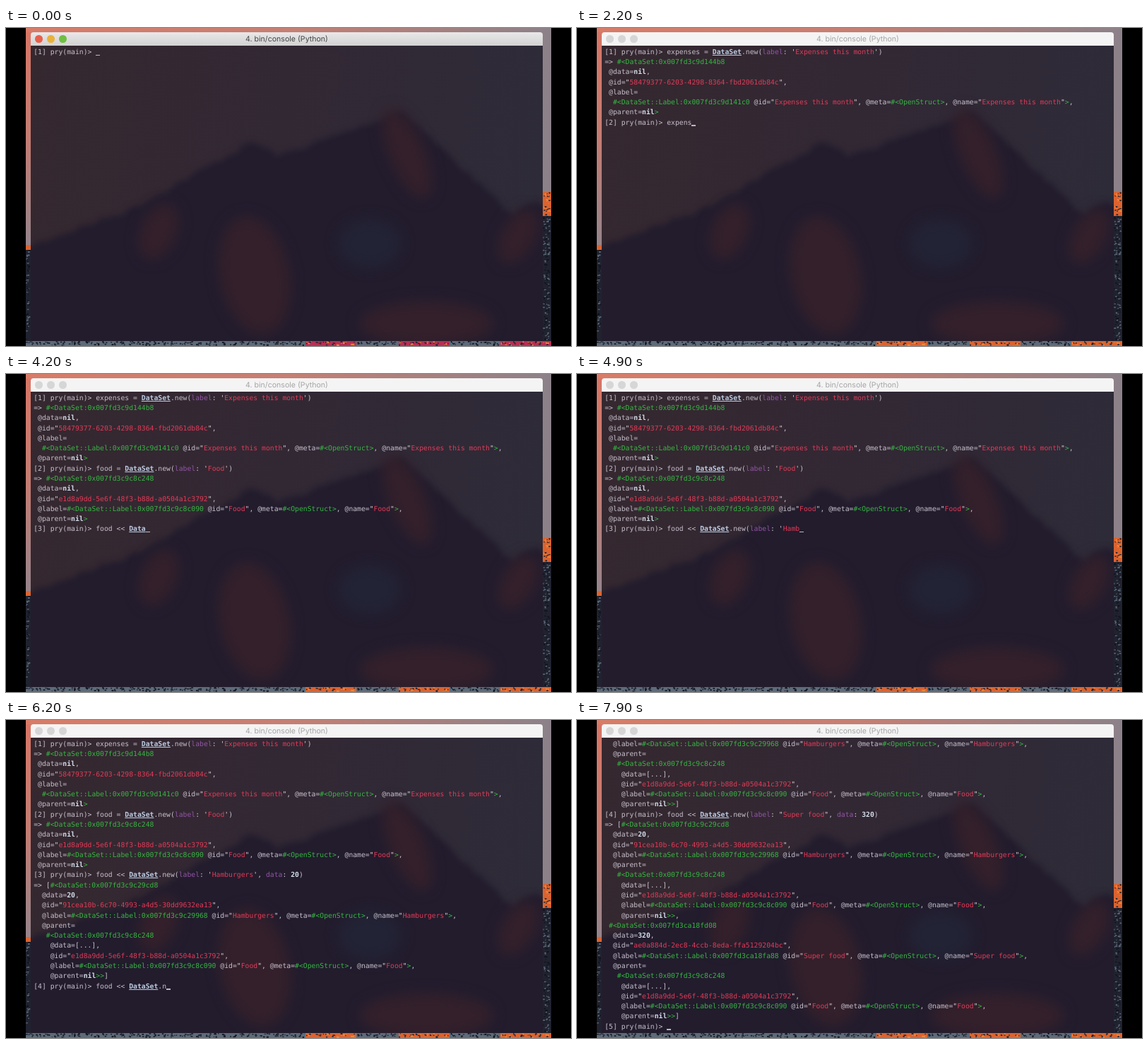
Recreate the animation shown at these times as an HTML page with a canvas. Size 800 by 450 pixels, loop 8 s.

```html
<!DOCTYPE html>
<html lang="en">
<head>
<meta charset="utf-8">
<title>Console session</title>
<style>
html, body { margin: 0; width: 100%; height: 100%; overflow: hidden; background: #000; }
#stage { position: relative; width: 800px; height: 450px; overflow: hidden; }
canvas { position: absolute; left: 0; top: 0; }
#bar {
  position: absolute; left: 35px; top: 6px; width: 725px; height: 19px;
  border-radius: 4px 4px 0 0; background: #f4f4f4; color: #a5a5a5;
  font: 10.6px/19px Inter, "Liberation Sans", sans-serif; text-align: center;
  text-rendering: geometricPrecision;
}
#bar.active { background: linear-gradient(#e9e8e9, #d3d2d3); color: #444; }
#buttons { position: absolute; left: 6.3px; top: 4.3px; display: flex; gap: 6.6px; }
#buttons i { width: 10.4px; height: 10.4px; border-radius: 50%; background: #d6d6d6; }
.active i { background: var(--c) !important; }
pre {
  position: absolute; left: 39.2px; top: 27.8px; margin: 0; color: #c6c0cc;
  font: 9.76px/14.28px "DejaVu Sans Mono", "Liberation Mono", monospace;
  text-rendering: geometricPrecision;
}
.str { color: #e33a57; }
.quote { color: #dcd3d6; }
.obj { color: #35b742; }
.key { color: #9354a6; }
.val, .const { color: #d3deea; font-weight: bold; }
.const { color: #bccbe2; text-decoration: underline; }
.cursor { display: inline-block; width: 5.9px; height: 1.3px; background: #bdb9c8; vertical-align: -2px; }
</style>
</head>
<body>
<div id="stage">
  <canvas width="800" height="450"></canvas>
  <div id="bar">
    <div id="buttons"><i style="--c:#e8604c"></i><i style="--c:#e9b23c"></i><i style="--c:#70bf44"></i></div>
    4. bin/console (Python)
  </div>
  <pre></pre>
</div>
<script>
const LOOP = 8000, STEP = 100, ROWS = 29, FOCUS_END = 300;
const LEFT = 28, RIGHT = 772, BOTTOM = 450;
const win = { x: 35, y: 20, w: 725, h: 423 };
const ctx = document.querySelector('canvas').getContext('2d');
const bar = document.querySelector('#bar');
const screen = document.querySelector('pre');

// ---- wallpaper and translucent window ----

function gradient(x, y, ...colors) {
  const g = ctx.createLinearGradient(LEFT, 0, x, y);
  colors.forEach((c, i) => g.addColorStop(i / (colors.length - 1), c));
  return g;
}

function rect(color, x, y, w, h) {
  ctx.fillStyle = color;
  ctx.fillRect(x, y, w, h);
}

function seeded(seed) {
  return () => (seed = seed * 16807 % 2147483647) / 2147483647;
}

function mottle(random, base, colors, x, y, w, h) {
  rect(base, x, y, w, h);
  for (let i = 0; i < w * h / 14; i++) {
    rect(colors[Math.floor(random() * colors.length)],
      x + random() * (w - 3), y + random() * (h - 2), 1 + random() * 2, 1 + random());
  }
}

function drawDesktop(active) {
  const random = seeded(41);
  const ember = '#dc632f', navy = '#20222f', slate = '#5d6b7a', black = '#11131c';
  const hot = active ? '#b92f55' : ember;
  const edge = win.y + win.h, side = win.x + win.w;
  rect(gradient(RIGHT, 0, '#d87c68', '#c67f73', '#8c8189'), LEFT, 0, RIGHT - LEFT, 235);
  rect(gradient(LEFT, 310, '#d87565', '#c47c72', '#94848c'), LEFT, 6, 7, 304);
  rect(ember, LEFT, 307, 7, 8);
  mottle(random, ember, [navy, '#f08a3c'], side, 232, RIGHT - side, 34);
  mottle(random, navy, [slate, black], side, 266, RIGHT - side, edge - 266);
  mottle(random, navy, [slate, black], LEFT, 314, 7, edge - 314);

  // glowing rocks alternate with slate along the lower edge
  for (let x = LEFT; x < RIGHT; x += 12) {
    const glowing = x > 410 && Math.sin((x - 418) / 22) > -0.1;
    mottle(random, glowing ? hot : slate, [navy, glowing ? '#f08a3c' : black], x, edge, 12, BOTTOM - edge);
  }
}

// each peak: x, height, left slope, right slope
const PEAKS = [[350, 157, 0.55, 0.55], [562, 114, 0.36, 0.95], [740, 243, 0.9, 0.1]];
// each lit face: x, y, radii, tilt
const FACES = [[568, 178, 26, 68, -0.4], [216, 288, 26, 42, 0.4], [352, 350, 50, 85, -0.2],
  [725, 295, 24, 42, 0.5], [595, 418, 95, 32, 0]];

const ridge = x => Math.min(...PEAKS.map(([px, py, l, r]) => py + (x < px ? (px - x) * l : (x - px) * r)));

function ellipse(color, x, y, rx, ry, tilt) {
  ctx.fillStyle = color;
  ctx.beginPath();
  ctx.ellipse(x, y, rx, ry, tilt, 0, 7);
  ctx.fill();
}

function drawWindow() {
  const random = seeded(7);
  ctx.save();
  ctx.beginPath();
  ctx.rect(win.x, win.y, win.w, win.h);
  ctx.clip();
  rect(gradient(RIGHT, 120, '#35282f', '#322834', '#2e2b38'), win.x, win.y, win.w, win.h);
  ctx.filter = 'blur(4px)';
  ctx.fillStyle = '#221c2d';
  ctx.beginPath();
  ctx.moveTo(0, 500);
  for (let x = 0; x <= 800; x += 8) ctx.lineTo(x, ridge(x) + random() * 8);
  ctx.lineTo(800, 500);
  ctx.fill();
  ctx.filter = 'blur(9px)';
  FACES.forEach(face => ellipse('#33202b', ...face));
  ellipse('#222335', 515, 305, 45, 35, 0);
  ctx.restore();
}

function drawBackdrop(active) {
  rect('#000', 0, 0, 800, BOTTOM);
  drawDesktop(active);
  drawWindow();
}

// ---- console session ----

const label = (addr, name) =>
  `#<DataSet::Label:0x007fd3${addr} @id="${name}", @meta=#<OpenStruct>, @name="${name}">`;

function dataSet(indent, addr, data, id, tag, parent = 'nil') {
  const pad = '\n' + ' '.repeat(indent);
  return `#<DataSet:0x007fd3${addr}` + [`data=${data},`, `id="${id}",`, `label=${tag},`, `parent=${parent}>`]
    .map(field => `${pad}@${field}`).join('');
}

const food = (indent, data) => dataSet(indent, 'c9c8c248', data,
  'e1d8a9dd-5e6f-48f3-b88d-a0504a1c3792', label('c9c8c090', 'Food'));
const child = (...fields) => dataSet(2, ...fields, '\n   ' + food(4, '[...]'));
const burgers = child('c9c29cd8', 20, '91cea10b-6c70-4993-a4d5-30dd9632ea13',
  label('c9c29968', 'Hamburgers'));
const superFood = child('ca18fd08', 320, 'ae0a884d-2ec8-4ccb-8eda-ffa5129204bc',
  label('ca18fa88', 'Super food'));

// typed evenly from start to end, run when the next entry starts;
// an entry without output is typed and then erased
const session = [
  { start: 550, end: 1900, text: "expenses = DataSet.new(label: 'Expenses this month')",
    output: dataSet(1, 'c9d144b8', 'nil', '58479377-6203-4298-8364-fbd2061db84c',
      '\n  ' + label('c9d141c0', 'Expenses this month')) },
  { start: 2000, end: 2540, text: 'expenses' },
  { start: 2600, end: 3670, text: "food = DataSet.new(label: 'Food')", output: food(1, 'nil') },
  { start: 3770, end: 5540, text: "food << DataSet.new(label: 'Hamburgers', data: 20)",
    output: `[${burgers}]` },
  { start: 5700, end: 7220, text: 'food << DataSet.new(label: "Super food", data: 320)',
    output: `[${burgers},\n ${superFood}]` },
  { start: 7400, end: LOOP, text: '' }
];

function typed({ start, end, text, output }, t) {
  const p = Math.min(1, Math.max(0, (t - start) / (end - start)));
  const share = output ? p : 1 - Math.abs(2 * p - 1);
  return text.slice(0, Math.round(share * text.length));
}

function linesAt(t) {
  const lines = [];
  let number = 1;
  for (const [i, entry] of session.entries()) {
    const prompt = `[${number}] pry(main)> `;
    const next = session[i + 1];
    if (!next || t < next.start) {
      lines.push(prompt + typed(entry, t));
      break;
    }
    if (!entry.output) continue;
    lines.push(prompt + entry.text, ...`=> ${entry.output}`.split('\n'));
    number++;
  }
  return lines.slice(-ROWS);
}

const TOKEN = new RegExp([
  /(?<plain>^\[\d\] pry\(main\)> |^=> )/,
  /(?<str>"[^"]*"?|'[^']*'?)/,
  /(?<obj>#<[\w:]+|>+)/,
  /(?<val>\b(?:nil|\d+)\b)/,
  /(?<const>\b[A-Z]\w*)/,
  /(?<key>\w+(?=:))/,
  /\w+|./
].map(r => r.source).join('|'), 'g');

const escape = s => s.replace(/</g, '&lt;');
const span = (kind, s) => `<span class="${kind}">${escape(s)}</span>`;

function paint(line) {
  return line.replace(TOKEN, (token, ...rest) => {
    const groups = rest.at(-1);
    const kind = Object.keys(groups).find(k => groups[k] !== undefined);
    if (kind === 'str') return token.replace(/["']|[^"']+/g, s => span(/["']/.test(s) ? 'quote' : 'str', s));
    return kind && kind !== 'plain' ? span(kind, token) : escape(token);
  });
}

// ---- playback ----

let lastStep = -1, lastActive;

function render() {
  const step = Math.floor(performance.now() % LOOP / STEP);
  if (step !== lastStep) {
    lastStep = step;
    const t = step * STEP, active = t < FOCUS_END;
    if (active !== lastActive) {
      lastActive = active;
      bar.className = active ? 'active' : '';
      drawBackdrop(active);
    }
    screen.innerHTML = linesAt(t).map(paint).join('\n') + '<span class="cursor"></span>';
  }
  requestAnimationFrame(render);
}
render();
</script>
</body>
</html>
```
